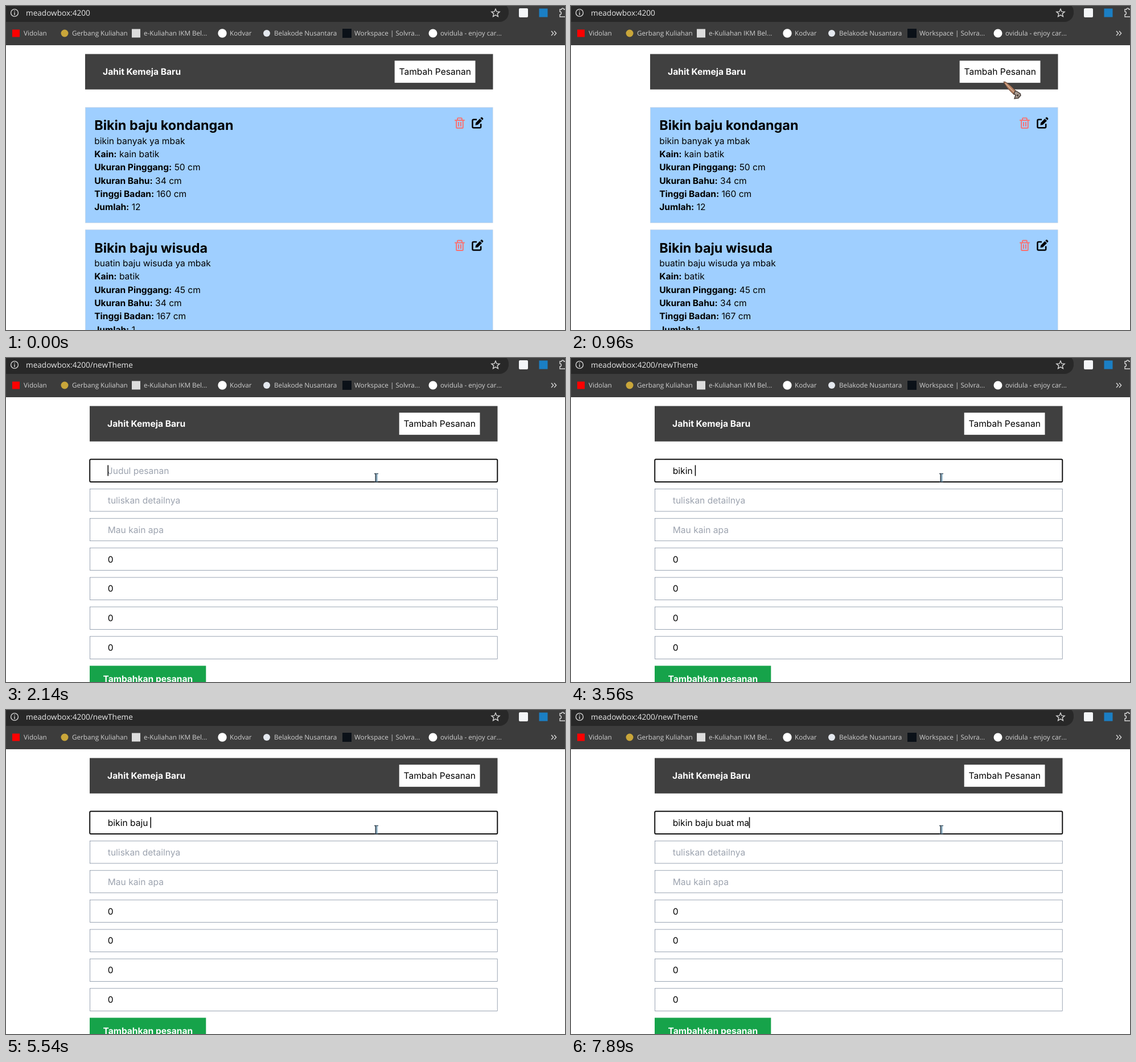
An HTML page that plays this animation: 982 px wide and 570 px high, repeating every 8000 ms.

```html
<!DOCTYPE html>
<html lang="id">
<head>
<meta charset="utf-8">
<title>Order form</title>
<style>
  html, body { margin: 0; width: 100%; height: 100%; overflow: hidden; background: #fff; }
  svg { display: block; }
  text { font: 15.576px Inter, sans-serif; white-space: pre; text-rendering: geometricPrecision; }
  .bold { font-weight: 700; }
  .title { font-size: 23.36px; font-weight: 700; }
  .hint { fill: #9ca3af; }
  .url { font: 13.6px "Open Sans", sans-serif; fill: #e8e8e8; }
  .bookmark { font: 11.7px "Open Sans", sans-serif; fill: #cfcfcf; }
  .line { fill: none; stroke: #d6d6d6; stroke-width: 1.4; }
</style>
</head>
<body>
<svg id="stage" width="982" height="570" viewBox="0 0 982 570"></svg>
<script>
const LOOP = 8000;
const OPEN_FORM = 1040;
const FOCUS = 1900;
const HOST = "meadowbox:4200";
const TYPED = "bikin baju buat ma";
const KEY_TIMES = [2690, 2850, 3010, 3170, 3330, 3500, 3720, 4100, 4560,
                   4850, 5150, 5750, 5950, 6150, 6350, 6550, 6750, 6810];
// time, x, y of the pointer
const POINTER = [[140, 932, 529], [420, 830, 300], [650, 748, 70], [890, 760, 133],
                 [1150, 760, 133], [1700, 651, 214], [1820, 651, 214], [1950, 650.5, 210.5]];

// Page geometry: the page is shown slightly reduced, with hairline borders.
const CONTENT_TOP = 178;
const CONTENT_WIDTH = 716.5;
const BORDER = .65;
const LINE_HEIGHT = 23.36;
const FIELD_HEIGHT = 40.24;
const FIELD_PITCH = 51.92;

const rect = (x, y, w, h, fill, extra = "") =>
  `<rect x="${x}" y="${y}" width="${w}" height="${h}" fill="${fill}" ${extra}/>`;
const bordered = (x, y, w, h, fill, color) =>
  rect(x + BORDER / 2, y + BORDER / 2, w - BORDER, h - BORDER, fill,
       `stroke="${color}" stroke-width="${BORDER}"`);
const circle = (x, y, r, fill, extra = "") =>
  `<circle cx="${x}" cy="${y}" r="${r}" fill="${fill}" ${extra}/>`;
const text = (x, y, content, cls = "", extra = "") =>
  `<text x="${x}" y="${y}" class="${cls}" ${extra}>${content}</text>`;

function browserBar() {
  const bookmarks = [
    [31, "Vidolan", rect(11, 41.5, 13, 13, "#f00")],
    [116, "Gerbang Kuliahan", circle(103, 48, 6.5, "#c9a63a")],
    [242, "e-Kuliahan IKM Bel...", rect(221, 40.5, 15, 15, "#ddd")],
    [393, "Kodvar", circle(380, 48, 7.7, "#fff")],
    [471, "Belakode Nusantara", circle(458, 48, 6, "#e4e8ee")],
    [612, "Workspace | Solvra...", rect(591, 40, 16, 16, "#0b1118")],
    [763, "ovidula - enjoy car...", circle(750, 48, 7.5, "#fff")]
  ];
  return rect(0, 0, 982, 69, "#3c3c3c")
    + rect(-30, -6, 913, 34, "#282828", 'rx="16"')
    + circle(15, 12, 6.4, "none", 'class="line"')
    + `<path class="line" d="M15 11v5M15 8v1.6"/>`
    + text(35, 17, "", "url", 'id="url"')
    + `<path class="line" d="M860 5.2l2 4.7 5.1.4-3.9 3.3 1.2 5-4.4-2.7-4.4 2.7 1.2-5-3.9-3.3 5.1-.4z"/>`
    + rect(901, 4, 16, 16, "#f4f6f8", 'rx="2"')
    + rect(936.5, 4.5, 15, 15, "#1b7fc4")
    + `<path class="line" d="M984 6h-4a2 2 0 0 0-4 0h-3v4a2.5 2.5 0 0 1 0 5v4h11"/>`
    + bookmarks.map(([x, label, icon]) => icon + text(x, 52, label, "bookmark")).join("")
    + `<path class="line" d="M958 44l3.6 4-3.6 4M963 44l3.6 4-3.6 4"/>`;
}

function header() {
  return rect(139, 84.5, CONTENT_WIDTH, 62.3, "#404040")
    + text(170.1, 121.3, "Jahit Kemeja Baru", "bold", 'fill="#fff"')
    + rect(682.7, 96.2, 141.8, 38.9, "#fff")
    + text(690.6, 121.3, "Tambah Pesanan");
}

function card(top, title, detail, fields) {
  const lines = fields.map(([label, value], i) =>
    text(155.2, 88 + LINE_HEIGHT * i, `<tspan class="bold">${label}:</tspan> ${value}`)).join("");
  return `<g transform="translate(0 ${top})">`
    + bordered(139, 0, CONTENT_WIDTH, 203.7, "#9fcfff", "#cbd5e1")
    + text(155.2, 40.3, title, "title")
    + text(155.2, 64.6, detail)
    + lines
    + `<path transform="translate(785.3 16.2) scale(.974)" fill="#f87171" fill-rule="evenodd"
        d="M5 20a2 2 0 0 0 2 2h10a2 2 0 0 0 2-2V8h2V6h-4V4a2 2 0 0 0-2-2H9a2 2 0 0 0-2 2v2H3v2h2zM9 4h6v2H9zM7 8h10v12H7zM9 10h2v8H9zM13 10h2v8h-2z"/>`
    + `<path d="M827 21.7h-5.5a2 2 0 0 0-2 2v10.5a2 2 0 0 0 2 2h10.7a2 2 0 0 0 2-2v-5"
        fill="none" stroke="#000" stroke-width="2.5"/>`
    + `<path d="M824.5 31.7l.7-4.2 7.2-7.2 3.6 3.6-7.2 7.2zM833.3 19.3l1.2-1.2a1.5 1.5 0 0 1 2.1 0l1.4 1.4a1.5 1.5 0 0 1 0 2.1l-1.2 1.2z"/>`
    + `</g>`;
}

function listPage() {
  return card(CONTENT_TOP, "Bikin baju kondangan", "bikin banyak ya mbak", [
      ["Kain", "kain batik"], ["Ukuran Pinggang", "50 cm"], ["Ukuran Bahu", "34 cm"],
      ["Tinggi Badan", "160 cm"], ["Jumlah", "12"]])
    + card(CONTENT_TOP + 215.4, "Bikin baju wisuda", "buatin baju wisuda ya mbak", [
      ["Kain", "batik"], ["Ukuran Pinggang", "45 cm"], ["Ukuran Bahu", "34 cm"],
      ["Tinggi Badan", "167 cm"], ["Jumlah", "1"]]);
}

function formPage() {
  const hints = ["Judul pesanan", "tuliskan detailnya", "Mau kain apa"];
  let out = "";
  for (let i = 0; i < 7; i++) {
    const y = CONTENT_TOP + FIELD_PITCH * i;
    out += bordered(147, y, CONTENT_WIDTH, FIELD_HEIGHT, "#fff", "#64748b")
      + text(178.8, y + 25.8, hints[i] || "0", hints[i] ? "hint" : "", i ? "" : 'id="hint"');
  }
  const buttonTop = CONTENT_TOP + FIELD_PITCH * 7;
  return out
    + rect(147.2, 178.3, 716.1, 39.6, "none", 'id="ring" rx="2" stroke="#101010" stroke-width="1.95"')
    + text(178.8, CONTENT_TOP + 25.8, "", "", 'id="typed"')
    + rect(0, 188.5, 1.5, 19, "#000", 'id="caret"')
    + rect(147, buttonTop, 204.3, 46.7, "#16a34a")
    + text(170.4, buttonTop + 29, "Tambahkan pesanan", "bold", 'fill="#fff"');
}

const wand = `<g id="wand">
  <path d="M0 0L4 1 12 7 23 18 18 23 8 13 1 3z" fill="#b07c5e" stroke="#5a4135" stroke-width=".9"/>
  <path d="M3 3L19 19" stroke="#dcb398" stroke-width="1.2"/>
  <path d="M21 16l8 5 1 3-4 5-7 1 2-6-3-3z" fill="#a89a90" stroke="#3c3430" stroke-width="1.4"/>
  <path d="M22 24l4-2v5z" fill="#4a403b"/></g>`;
const beam = `<g id="beam">
  <path d="M-3.5 -7h7M-3.5 7h7" stroke="#3c4c58" stroke-width="1.4"/>
  <path d="M-1 -7v14" stroke="#34434f" stroke-width="2"/>
  <path d="M1 -7v14" stroke="#79a2ba" stroke-width="2"/></g>`;

const byId = id => document.getElementById(id);
const show = (id, visible) => byId(id).setAttribute("display", visible ? "inline" : "none");

byId("stage").innerHTML = rect(0, 0, 982, 570, "#fff")
  + `<g id="header">${header()}</g><g id="list">${listPage()}</g><g id="form">${formPage()}</g>`
  + browserBar() + wand + beam;

function pointerAt(t) {
  const next = POINTER.findIndex(key => key[0] > t);
  if (next < 0) return POINTER[POINTER.length - 1].slice(1);
  if (next === 0) return POINTER[0].slice(1);
  const [t0, x0, y0] = POINTER[next - 1];
  const [t1, x1, y1] = POINTER[next];
  const p = (t - t0) / (t1 - t0);
  const eased = p * p * (3 - 2 * p);
  return [x0 + (x1 - x0) * eased, y0 + (y1 - y0) * eased];
}

function draw(t) {
  const onForm = t >= OPEN_FORM;
  const focused = t >= FOCUS;
  show("list", !onForm);
  show("form", onForm);
  byId("header").setAttribute("transform", `translate(${onForm ? 8 : 0} 0)`);
  byId("url").textContent = HOST + (onForm ? "/newTheme" : "");

  const count = KEY_TIMES.filter(time => time <= t).length;
  const typed = byId("typed");
  typed.textContent = TYPED.slice(0, count);
  show("hint", !count);
  show("ring", focused);

  // The caret restarts its blink at every key press.
  const sinceKey = t - (count ? KEY_TIMES[count - 1] : FOCUS);
  show("caret", focused && sinceKey % 1000 < 500);
  const width = onForm && count ? typed.getComputedTextLength() : 0;
  byId("caret").setAttribute("x", 178.5 + width);

  const [x, y] = pointerAt(t);
  const overInput = onForm && y > CONTENT_TOP;
  show("wand", t >= 140 && !overInput);
  show("beam", overInput);
  byId(overInput ? "beam" : "wand").setAttribute("transform", `translate(${x} ${y})`);
}

function tick() {
  draw(performance.now() % LOOP);
  requestAnimationFrame(tick);
}
tick();
</script>
</body>
</html>
```
